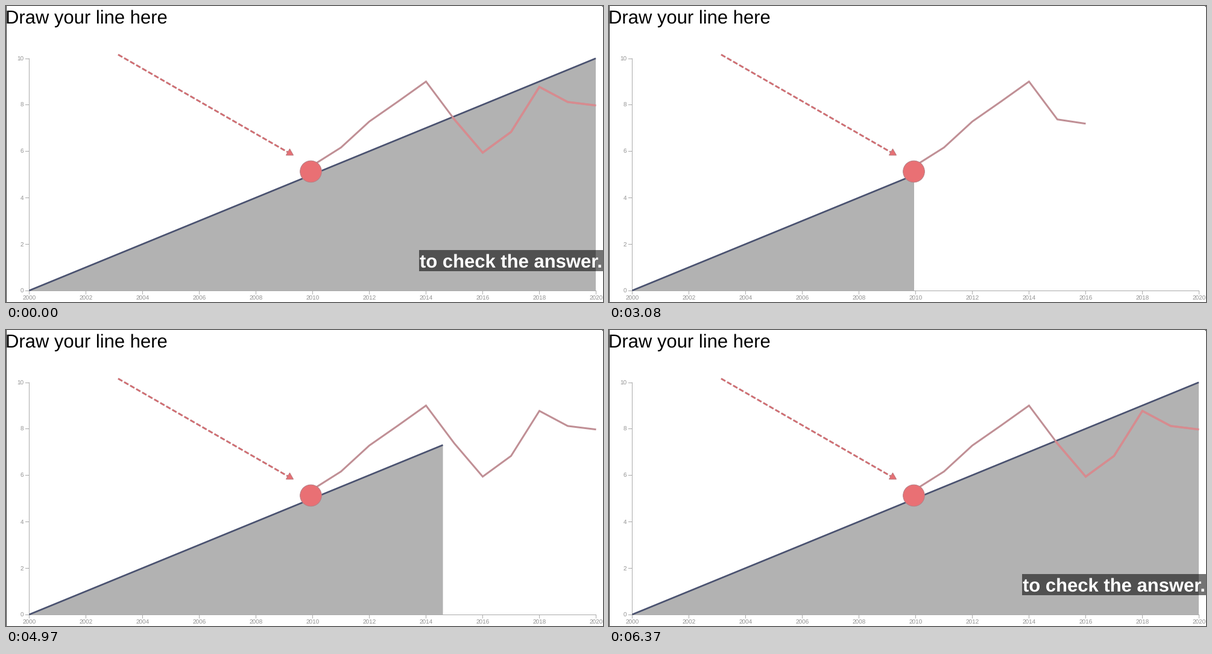
Write a matplotlib script that moves like this. It is 990x490 px and loops after 6.44 s.

```python
import numpy as np
import matplotlib.pyplot as plt
from matplotlib.animation import FuncAnimation
from matplotlib.patches import Circle, Polygon, Rectangle

plt.rcParams.update({"text.hinting": "none", "text.hinting_factor": 1,
                     "path.snap": False})

W, H, DPI = 990, 490, 100
STEP, FRAMES = 70, 92
PT = 72 / DPI
SANS = "Liberation Sans"

RESET, CAPTION_OFF, CAPTION_ON = 910, 1260, 5040
REVEAL_START, REVEAL_TIME = 4200, 1580
EDGE_MIN, EDGE_MAX = 506, 978

# Drawn values for 2010..2020 and the moment the pointer enters each year
VALUES = np.array([5.4, 6.17, 7.29, 8.14, 9.01, 7.38, 5.95, 6.84, 8.78, 8.13, 7.98])
ENTER = np.array([1330, 1610, 1890, 2200, 2470, 2750, 3005, 3340, 3640, 3990, 4270, 4500])

fig = plt.figure(figsize=(W / DPI, H / DPI), dpi=DPI, facecolor="white")
ax = fig.add_axes([0, 0, 1, 1])
ax.set_xlim(0, W)
ax.set_ylim(H, 0)
ax.axis("off")


def px(year):
    return 38.5 + 47 * (year - 2000)


def py(value):
    return 471.5 - 38.45 * value


def line(xs, ys, color, width, **kw):
    kw.setdefault("solid_capstyle", "butt")
    return ax.plot(xs, ys, color=color, lw=width * PT, **kw)[0]


def label(x, y, text, size, color, **kw):
    return ax.text(x, y, text, family=SANS, size=size * PT, color=color,
                   va="baseline", **kw)


def cubic_in_out(t):
    t = np.clip(t, 0, 1)
    return 4 * t**3 if t < 0.5 else 1 - 4 * (1 - t)**3


def smooth(t):
    t = np.clip(t, 0, 1)
    return t * t * (3 - 2 * t)


# Answer area and line
area = ax.add_patch(Polygon([(0, 0)] * 3, fc="#b2b2b2", ec="none", zorder=1))
answer = line([], [], "#4a5270", 2.7, zorder=3)

# Axes
AXIS, TICK_TEXT = "#ababab", "#929292"
line([38.5, 38.5], [86.5, 471.5], AXIS, 1, zorder=2)
line([38, 979], [471.5, 471.5], AXIS, 1, zorder=2)
for v in range(0, 11, 2):
    y = np.floor(py(v)) + 0.5
    line([32, 38.5], [y, y], AXIS, 1, zorder=2)
    label(29.5, y + 3.3, str(v), 9.6, TICK_TEXT, ha="right")
for year in range(2000, 2021, 2):
    x = px(year)
    line([x, x], [471.5, 477.5], AXIS, 1, zorder=2)
    label(x, 486.5, str(year), 9.6, TICK_TEXT, ha="center")

# User line, pinker where it crosses the filled area
guess = line([], [], "#c08f95", 3, zorder=4, solid_joinstyle="miter")
guess_in = line([], [], "#d78b8f", 3.4, zorder=5, solid_joinstyle="miter")
ax.add_patch(Circle((505.5, 274), 17.8, fc="#e97074", ec="#b67f85",
                    lw=1 * PT, zorder=6))

# Pointing arrow: pink dashes with a greyer rim
for color, width in (("#b98a8f", 3), ("#d9686c", 1.8)):
    line([186, 467], [80.5, 241.8], color, width, zorder=6,
         linestyle=(0, (8 / width, 3.5 / width)), dash_capstyle="butt")
ax.add_patch(Polygon([(476.5, 247), (470.5, 236.5), (464.5, 247)], fc="#e87074",
                     ec="#b9747a", lw=1 * PT, zorder=6))

# Window edge and heading
ax.add_patch(Rectangle((0, 0), 1, H, fc="#333333", ec="none", zorder=7))
ax.add_patch(Polygon([(988, 0), (990, 0), (990, 2)], fc="#555555", ec="none", zorder=7))
label(-1.3, 28.6, "Draw your line here", 30.9, "black", zorder=8)

caption = [
    ax.add_patch(Rectangle((685, 404), 305, 35, fc="black", ec="none",
                           alpha=0.55, zorder=9)),
    label(686.3, 432.4, "to check the answer.", 31, "white", weight="bold", zorder=10),
]


def guess_points(t):
    if t < RESET or t >= ENTER[-1]:
        return px(np.arange(2010, 2021)), py(VALUES)
    n = int(np.searchsorted(ENTER, t, side="right"))
    if n < 2:
        return [], []
    vals = VALUES[:n].copy()
    part = smooth((t - ENTER[n - 1]) / (ENTER[n] - ENTER[n - 1]))
    vals[-1] = VALUES[n - 2] + (VALUES[n - 1] - VALUES[n - 2]) * part
    return px(2010 + np.arange(n)), py(vals)


def draw(i):
    t = i * STEP
    done = 1 if t < RESET else cubic_in_out((t - REVEAL_START) / REVEAL_TIME)
    edge = EDGE_MIN + (EDGE_MAX - EDGE_MIN) * done
    top = py((edge - 38.5) / 94)
    area.set_xy([(38.5, 471.5), (edge, top), (edge, 471.5)])
    answer.set_data([38.5, edge], [471, top - 0.5])

    xs, ys = guess_points(t)
    guess.set_data(xs, ys)
    guess_in.set_data(xs, ys)
    guess_in.set_clip_path(area)

    for part in caption:
        part.set_visible(t < CAPTION_OFF or t >= CAPTION_ON)
    return [area, answer, guess, guess_in, *caption]


anim = FuncAnimation(fig, draw, frames=FRAMES, interval=STEP, repeat=True,
                     repeat_delay=0, blit=False)
plt.show()
```
